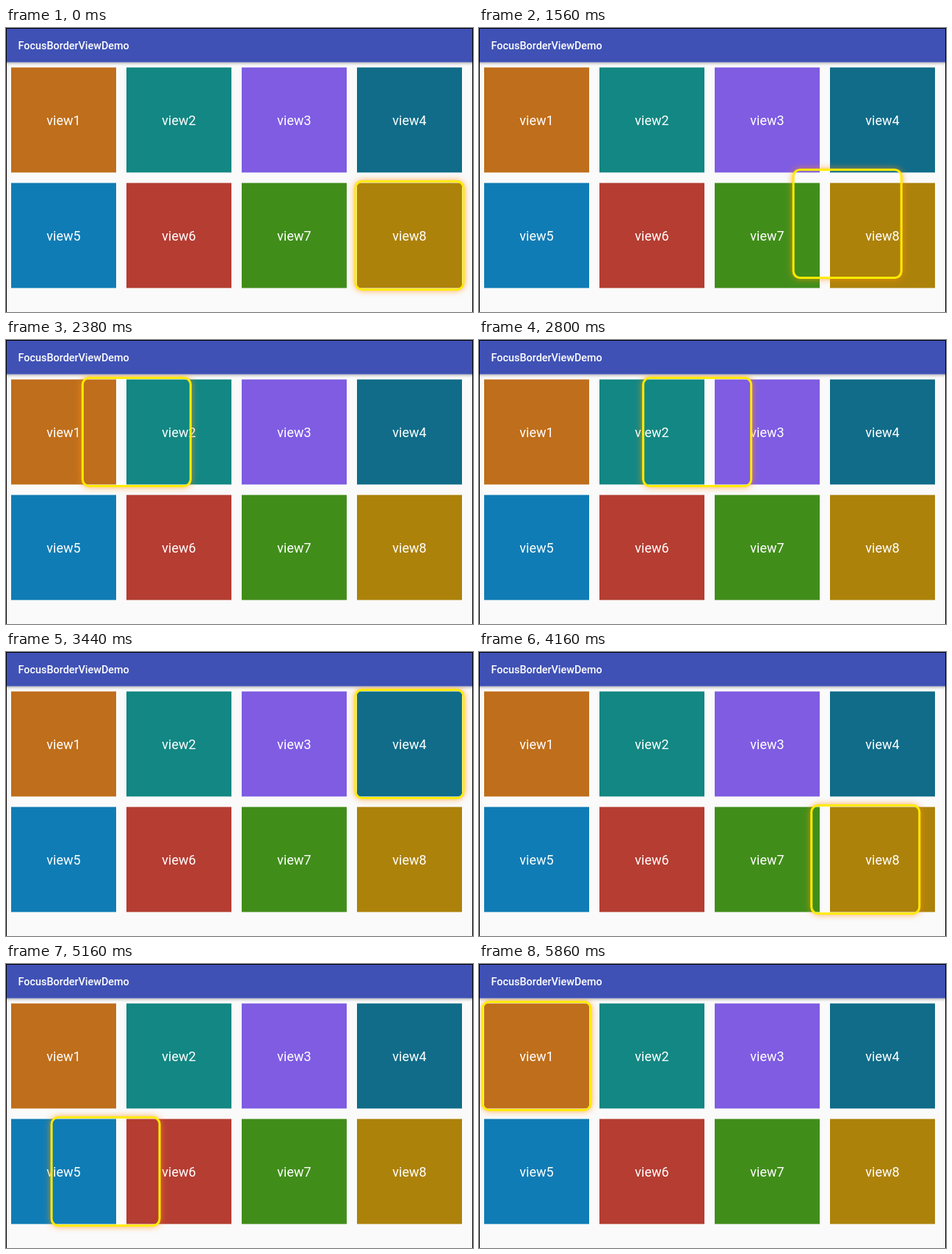
Animation, 636 px wide and 386 px high, one loop 6.42 s. Source, as an HTML page with a canvas:

```html
<!DOCTYPE html>
<html lang="en">
<head>
<meta charset="utf-8">
<title>FocusBorderViewDemo</title>
<style>
  html, body { margin: 0; width: 100%; height: 100%; overflow: hidden; background: #fafafa; }
  canvas { display: block; }
</style>
</head>
<body>
<canvas id="stage" width="636" height="386"></canvas>
<script>
const ctx = document.getElementById('stage').getContext('2d');
const WIDTH = 636, HEIGHT = 386, LOOP = 6420, TICK = 20;
const HEADER_BOTTOM = 46.5;
const CELL = { x: 7, y: 53.6, w: 143, h: 142.8, pitch: 157 };
const COLORS = ['#bf6e1b', '#138783', '#7f5ce2', '#106c89',
                '#107cb5', '#b53d32', '#418d1a', '#ad820a'];

// Focus moves: start and end in ms, and the index of the newly focused cell.
const FIRST_FOCUS = 7;
const MOVES = [
  { start: 1549, end: 1760, to: 0 },
  { start: 2289, end: 2520, to: 1 },
  { start: 2749, end: 2980, to: 2 },
  { start: 3245, end: 3440, to: 3 },
  { start: 3645, end: 3840, to: 7 },
  { start: 4145, end: 4340, to: 6 },
  { start: 4610, end: 4800, to: 5 },
  { start: 5081, end: 5280, to: 4 },
  { start: 5649, end: 5860, to: 0 }
];
const STALL = { from: 2800, to: 2840 };

const decelerate = p => 1 - (1 - p) ** 2;

function cellOrigin(index) {
  return {
    x: CELL.x + (index % 4) * CELL.pitch,
    y: CELL.y + Math.floor(index / 4) * CELL.pitch
  };
}

function focusAt(time) {
  let t = Math.floor(time / TICK) * TICK;
  if (t >= STALL.from && t < STALL.to) t = STALL.from;
  let current = FIRST_FOCUS;
  for (const move of MOVES) {
    if (t < move.start) break;
    if (t < move.end) {
      const a = cellOrigin(current), b = cellOrigin(move.to);
      const p = decelerate((t - move.start) / (move.end - move.start));
      return { x: a.x + (b.x - a.x) * p, y: a.y + (b.y - a.y) * p };
    }
    current = move.to;
  }
  return cellOrigin(current);
}

function fillRect(color, x, y, w, h) {
  ctx.fillStyle = color;
  ctx.fillRect(x, y, w, h);
}

function drawCells() {
  ctx.font = '18px Roboto, sans-serif';
  ctx.textAlign = 'center';
  COLORS.forEach((color, i) => {
    const { x, y } = cellOrigin(i);
    fillRect(color, x, y, CELL.w, CELL.h);
    ctx.fillStyle = '#fff';
    ctx.fillText('view' + (i + 1), x + CELL.w / 2, Math.round(y + 78));
  });
}

function drawHeader() {
  const shadow = ctx.createLinearGradient(0, HEADER_BOTTOM, 0, HEADER_BOTTOM + 5);
  shadow.addColorStop(0, 'rgba(0,0,0,0.32)');
  shadow.addColorStop(0.4, 'rgba(0,0,0,0.11)');
  shadow.addColorStop(1, 'rgba(0,0,0,0)');
  fillRect(shadow, 0, HEADER_BOTTOM, WIDTH, 5);
  fillRect('#3f51b5', 0, 0, WIDTH, HEADER_BOTTOM);
  ctx.font = '500 14.4px Roboto, sans-serif';
  ctx.textAlign = 'left';
  ctx.fillStyle = '#fff';
  ctx.fillText('FocusBorderViewDemo', 16.5, 29);
}

function roundedBox({ x, y }, grow, radius) {
  const path = new Path2D();
  path.roundRect(x - grow, y - grow, CELL.w + 2 * grow, CELL.h + 2 * grow, radius);
  return path;
}

function drawFocus(origin) {
  ctx.save();
  ctx.beginPath();
  ctx.rect(1, 47, WIDTH - 2, HEIGHT - 47);
  ctx.clip();

  // The glow only shows outside the border.
  ctx.save();
  const outside = new Path2D();
  outside.rect(0, 0, WIDTH, HEIGHT);
  outside.addPath(roundedBox(origin, 2, 9));
  ctx.clip(outside, 'evenodd');
  ctx.shadowColor = 'rgba(255,145,10,0.8)';
  ctx.shadowBlur = 10;
  ctx.fillStyle = '#ffeb00';
  ctx.fill(roundedBox(origin, 3, 10));
  ctx.restore();

  ctx.strokeStyle = '#ffeb00';
  ctx.lineWidth = 3;
  ctx.stroke(roundedBox(origin, 2, 9));
  ctx.restore();
}

function drawFrameEdges() {
  fillRect('#000', 0, 0, WIDTH, 1);
  fillRect('#000', 0, 0, 1, HEIGHT);
  fillRect('#000', WIDTH - 1, 0, 1, HEIGHT);
}

function render(time) {
  fillRect('#fafafa', 0, 0, WIDTH, HEIGHT);
  drawCells();
  drawHeader();
  drawFocus(focusAt(time));
  drawFrameEdges();
}

const began = performance.now();
function tick() {
  render((performance.now() - began) % LOOP);
  requestAnimationFrame(tick);
}
tick();
</script>
</body>
</html>
```
